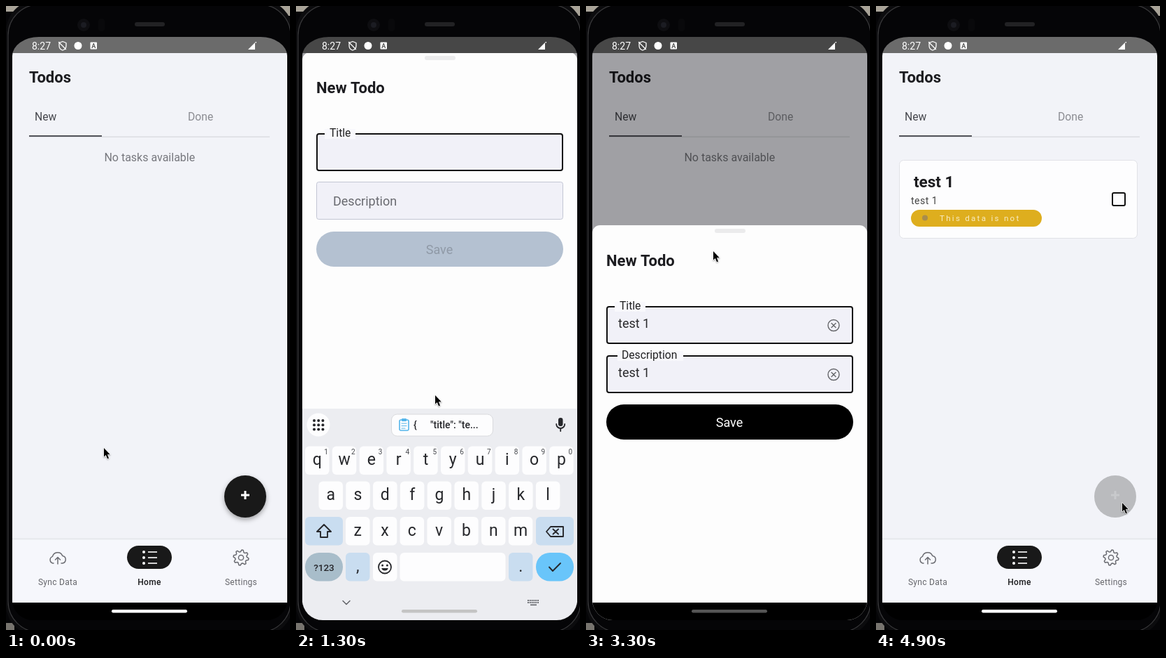
An HTML page with a canvas that plays this animation: 406x888 px, repeating every 5000 ms.

```html
<!DOCTYPE html>
<html lang="en">
<head>
<meta charset="utf-8">
<title>Todo app</title>
<style>
html, body { margin: 0; width: 100%; height: 100%; overflow: hidden; background: #000; }
canvas { display: block; }
</style>
</head>
<body>
<canvas id="stage" width="406" height="888"></canvas>
<script>
const c = document.getElementById('stage').getContext('2d');
const LOOP = 5000, STEP = 100;

// Keyframes: [time, value, ...]
const cursorPath = [[0, 140, 629], [100, 150, 634], [400, 338, 690], [600, 340, 692],
  [700, 294, 667], [1000, 210, 458], [1100, 205, 462], [1300, 199, 554], [1600, 199, 554],
  [2100, 204, 283], [2500, 204, 283], [2900, 182, 349], [3300, 182, 349], [3500, 200, 584],
  [3700, 200, 588], [4000, 219, 719], [4300, 290, 713], [4700, 352, 707]];
const sheetPath = [[700, 560], [800, 400], [900, 330], [1000, 312], [1100, 312], [1200, 96],
  [1300, 66], [1400, 67], [3100, 67], [3200, 180], [3300, 312], [3700, 312], [3800, 410],
  [3900, 610], [4000, 778], [4100, 860]];
const scrimPath = [[600, 0], [700, .34], [3700, .34], [3900, .27], [4000, .17], [4100, .07], [4200, 0]];
const toastPath = [[3800, 849], [3900, 762], [4000, 688], [4100, 670], [4200, 668]];
const barPath = [[1100, 255], [1300, 196], [1500, 50], [3100, 50], [3200, 85], [3600, 85], [3900, 255]];

function track(keys, t, i = 1) {
  if (t <= keys[0][0]) return keys[0][i];
  for (let k = 1; k < keys.length; k++) {
    const a = keys[k - 1], b = keys[k];
    if (t <= b[0]) return a[i] + (b[i] - a[i]) * (t - a[0]) / (b[0] - a[0]);
  }
  return keys[keys.length - 1][i];
}

function box(x, y, w, h, r, fill, stroke, lw = 1) {
  c.beginPath();
  c.roundRect(x, y, w, h, r);
  if (fill) { c.fillStyle = fill; c.fill(); }
  if (stroke) { c.strokeStyle = stroke; c.lineWidth = lw; c.stroke(); }
}

function dot(x, y, r, fill, stroke, lw = 1) {
  c.beginPath();
  c.arc(x, y, r, 0, 7);
  if (fill) { c.fillStyle = fill; c.fill(); }
  if (stroke) { c.strokeStyle = stroke; c.lineWidth = lw; c.stroke(); }
}

function text(s, x, y, size, color, { weight = 400, align = 'left', gap = 0 } = {}) {
  c.font = `${weight} ${size}px Roboto, sans-serif`;
  c.textAlign = align;
  c.letterSpacing = gap + 'px';
  c.fillStyle = color;
  c.fillText(s, x, y);
}

function path(d, x, y, { fill, stroke, lw = 1.5 } = {}) {
  const p = new Path2D(d);
  c.save();
  c.translate(x, y);
  c.lineJoin = c.lineCap = 'round';
  if (fill) { c.fillStyle = fill; c.fill(p); }
  if (stroke) { c.strokeStyle = stroke; c.lineWidth = lw; c.stroke(p); }
  c.restore();
}

function shadow(color, blur, dy) {
  c.shadowColor = color;
  c.shadowBlur = blur;
  c.shadowOffsetY = dy;
}

function typed(t, start) {
  return 'test 1'.slice(0, Math.max(0, Math.floor((t - start) / STEP) + 1));
}

function phone() {
  c.fillStyle = '#050507';
  c.fillRect(0, 0, 406, 888);
  c.fillStyle = '#a8a398';
  c.fillRect(0, 0, 20, 8);
  c.fillRect(390, 0, 16, 14);
  c.fillStyle = '#77746e';
  c.fillRect(0, 878, 12, 10);
  box(0, -8, 410, 904, 44, '#0c0c0e');
  box(3, -2, 404, 893, 44, '#050507', '#39393b', 1.2);
  dot(111, 27, 9, '#0e0e11');
  dot(111, 27, 4, '#1b1c22');
  box(132, 18, 9, 18, 4, '#09090b');
  box(184, 23, 43, 6, 3, '#222224');
}

function gear(x, y) {
  c.beginPath();
  for (let i = 0; i < 32; i++) {
    const a = (i + .5) / 32 * Math.PI * 2, r = i % 4 < 2 ? 11 : 8.3;
    c.lineTo(x + r * Math.cos(a), y + r * Math.sin(a));
  }
  c.closePath();
  c.lineJoin = 'round';
  c.strokeStyle = '#6b6c72';
  c.lineWidth = 1.5;
  c.stroke();
  dot(x, y, 3.6, null, '#6b6c72', 1.5);
}

function nav() {
  c.fillStyle = '#e6e7ec';
  c.fillRect(9, 757.5, 393, 2);
  c.fillStyle = '#f6f7fc';
  c.fillRect(9, 759.5, 393, 90);
  path('M-6 7h-1a5 5 0 0 1-.5-9.6A7.5 7.5 0 0 1 6.8-3.5 5.3 5.3 0 0 1 6.5 7H5M0 8v-9M-3.5 2 0-1.5 3.5 2',
    74, 786, { stroke: '#6b6c72' });
  box(173, 768, 64, 33, 16.5, '#191919');
  for (const y of [777, 785, 793]) {
    dot(197, y, 2, '#fff');
    c.fillStyle = '#fff';
    c.fillRect(203, y - .8, 13, 1.6);
  }
  gear(336, 785);
  const mid = { align: 'center', gap: .3 };
  text('Sync Data', 74, 824, 12, '#66676c', mid);
  text('Home', 205, 824, 12, '#1b1b1d', { ...mid, weight: 500 });
  text('Settings', 336, 824, 12, '#66676c', mid);
}

function fab(pressed) {
  c.save();
  if (!pressed) shadow('rgba(0,0,0,.35)', 7, 3);
  dot(342, 698, 30, pressed ? '#babbbe' : '#191919');
  c.restore();
  c.fillStyle = pressed ? '#c8c9cc' : '#fff';
  c.fillRect(336, 694.5, 12, 3);
  c.fillRect(340.5, 690, 3, 12);
}

function card(dim) {
  box(33.5, 219.5, 340, 111, 6, '#fdfdfe', '#e1e2e7');
  text('test 1', 54, 258, 22.5, '#1b1b1e', { weight: 700 });
  text('test 1', 50, 282, 14, '#444', { gap: .5 });
  box(50, 290, 187, 24, 12, dim ? '#e3b657' : '#deae1e');
  dot(70, 301.5, 4, '#a98d4c');
  text('This data is not', 91, 305.5, 11.5, '#f8ecc4', { gap: 2.3 });
  box(338, 266, 18, 18, 2, null, '#111', 2);
}

function home(t, dim) {
  c.fillStyle = '#f2f3f8';
  c.fillRect(9, 67, 393, 782);
  text('Todos', 33, 109, 22, '#1c1c20', { weight: 700 });
  text('New', 41, 163, 15.7, '#46474d');
  text('Done', 260, 163, 15.7, '#8b8c92');
  c.fillStyle = '#dcdde2';
  c.fillRect(33, 185.5, 344, 1.5);
  c.fillStyle = '#53545b';
  c.fillRect(33, 184, 104, 2);
  if (t >= 3900) card(dim);
  else text('No tasks available', 205.3, 221, 16, '#77787e', { align: 'center' });
  fab(t === 500 || t === 600 || t >= 4900);
  nav();
}

function field(label, y, active, value, labelX, gapX, gapW) {
  if (!active) {
    box(29.5, y - .5, 352, 53, 3, '#f1f1f8', '#c3c6d4');
    text(label, 53, y + 32.5, 18, '#696a70');
    return;
  }
  box(30, y + 1, 351, 52, 3, '#f1f1f8', '#111', 2);
  c.fillStyle = '#f8f8fc';
  c.fillRect(gapX, y - 6, gapW, 14);
  text(label, labelX, y + 5, 15.7, '#222');
  if (!value) return;
  text(value, 46, y + 31, 18, '#2a2a2d');
  dot(354, y + 27.5, 8, null, '#66676b', 1.4);
  path('M-3-3 3 3M3-3-3 3', 354, y + 27.5, { stroke: '#66676b', lw: 1.4 });
}

function sheet(t) {
  const y = track(sheetPath, t);
  const title = typed(t, 1400), note = typed(t, 2500);
  c.save();
  if (t >= 3900) c.globalAlpha = t < 4000 ? .85 : .65;
  box(9, y, 393, 900, 11, '#fdfdfd');
  box(184, y + 5, 44, 6, 3, '#ebebec');
  text('New Todo', 29, y + 58, 22, '#1c1c20', { weight: 700 });
  field('Title', y + 115, t >= 1200, title, 48, 41, 44);
  field('Description', y + 185, t >= 2300, note, 51, 45, 94);
  box(29, y + 255, 353, 50, 25, note ? '#000' : '#b4c1d1');
  text('Save', 205, y + 286.5, 18, note ? '#fff' : '#8f99a6', { align: 'center' });
  c.restore();
}

const BLUE = '#c9ddf0', INK = '#26272b';

function key(x, y, w, label, fill = '#fdfdfe', r = 6) {
  box(x, y, w, 40.5, r, fill);
  if (label) text(label, x + w / 2, y + 26.5, 23, INK, { align: 'center' });
}

function keyboard(dy) {
  c.save();
  c.translate(0, dy);
  c.fillStyle = '#ecedf1';
  c.fillRect(9, 573, 393, 310);
  dot(32, 596, 16.5, '#fdfdfe');
  for (let i = 0; i < 9; i++) dot(26 + i % 3 * 6.2, 590 + Math.floor(i / 3) * 6.2, 2, INK);

  box(136.5, 581, 145, 31, 8, '#fdfdfe', '#d9dadd');
  box(148, 589, 13, 15, 2, null, '#56b6ea', 1.6);
  box(151, 587, 7, 4, 1, '#56b6ea');
  path('M0 0h7M0 3.5h7M0 7h5', 151, 594, { stroke: '#56b6ea', lw: 1.2 });
  text('{', 168, 601, 14, INK, { weight: 500 });
  text('"title": "te...', 192, 601, 14, INK, { weight: 500 });

  box(375, 586, 6.5, 12, 3.2, INK);
  path('M-6 0a6 6 0 0 0 12 0M0 6v4', 378.2, 595, { stroke: INK, lw: 1.8 });

  const pitch = 38.8;
  [...'qwertyuiop'].forEach((k, i) => {
    const x = 13 + pitch * i;
    key(x, 626.5, 34.5, k);
    text((i + 1) % 10, x + 30, 638, 10, '#44464b', { align: 'center' });
  });
  [...'asdfghjkl'].forEach((k, i) => key(32.5 + pitch * i, 676.5, 34.5, k));
  [...'zxcvbnm'].forEach((k, i) => key(71 + pitch * i, 727, 34.5, k));

  key(13, 727, 54, '', BLUE);
  path('M0-10 10 0H5V8H-5V0H-10Z', 40, 748, { stroke: INK, lw: 1.9 });
  key(343, 727, 54, '', BLUE);
  path('M-12 0-6-7H12V7H-6ZM-2.5-3.5 5 3.5M5-3.5-2.5 3.5', 370, 748, { stroke: INK, lw: 1.9 });

  key(13, 778, 54, '', '#a8bdca', 20);
  text('?123', 40, 803.5, 13.5, INK, { align: 'center', weight: 500 });
  key(71, 778, 34.5, ',', BLUE);
  key(110, 778, 34.5);
  dot(127, 798.5, 9, null, INK, 1.8);
  dot(123.6, 796, 1.5, INK);
  dot(130.4, 796, 1.5, INK);
  path('M-4.8 0A5 5 0 0 0 4.8 0Z', 127, 800, { fill: INK });
  key(148.5, 778, 151, '');
  key(304, 778, 34.5, '.', BLUE);
  key(343, 778, 54, '', '#69c5fa', 20);
  path('M-8 0-3 5.5 8-5.5', 370, 798.5, { stroke: INK, lw: 1.9 });

  path('M-5-2.5 0 2.5 5-2.5', 72, 849, { stroke: '#63656a' });
  c.fillStyle = '#63656a';
  for (let i = 0; i < 12; i++) {
    c.fillRect(331 + i % 6 * 2.8, 845 + Math.floor(i / 6) * 3, 1.9, 1.9);
  }
  c.fillRect(335, 851.5, 9, 1.6);
  c.restore();
}

function statusBar(dim) {
  const g = Math.round(107 * (1 - dim));
  c.fillStyle = `rgb(${g},${g},${g})`;
  c.fillRect(9, 44, 393, 23);
  text('8:27', 37, 62, 14, '#fff');
  path('M0-6 5-4V0C5 3 3 5.5 0 6.5-3 5.5-5 3-5 0V-4ZM-5.5-5 4.5 5', 81, 56.5, { stroke: '#fff', lw: 1.3 });
  dot(103, 56.5, 5.5, '#fff');
  box(120.5, 51.5, 9.5, 10, 1, '#fff');
  text('A', 125.3, 60, 9, '#555', { align: 'center', weight: 700 });
  path('M0 10 10 0V10Z', 346, 52, { fill: '#fff' });
  c.fillStyle = '#fff';
  c.fillRect(356.5, 51, 1.5, 1.5);
}

function toast(t) {
  const y = track(toastPath, t);
  c.save();
  c.globalAlpha = track([[4400, 1], [4700, 0]], t);
  box(29, y, 353, 88, 4, '#2cad89');
  const ink = '#c6e6bf', mark = { stroke: '#8bd492', lw: 1.2 };
  dot(55, y + 44, 7.5, null, mark.stroke, mark.lw);
  path('M-3.5 0-1 2.5 3.5-2.5', 55, y + 44, mark);
  text('Success', 81, y + 32, 15, ink, { gap: .4 });
  text('Task added', 81, y + 50, 14, ink, { gap: .5 });
  text('successfully', 81, y + 68, 14, ink, { gap: .5 });
  path('M-4-4 4 4M4-4-4 4', 356, y + 44, { stroke: '#a6d685', lw: 1.2 });
  c.restore();
}

function cursor(t) {
  const arrow = 'M0 0V12.6L2.8 10 5 15.2 7 14.4 4.9 9.3H8.8Z';
  const x = track(cursorPath, t), y = track(cursorPath, t, 2);
  c.save();
  shadow('rgba(0,0,0,.35)', 2, 1);
  path(arrow, x, y, { stroke: '#fff', lw: 1.4 });
  c.restore();
  path(arrow, x, y, { fill: '#000' });
}

function draw(t) {
  const dim = track(scrimPath, t);
  const open = t >= 700 && t < 4100;
  const keys = t >= 1200 && t < 3200;
  phone();
  c.save();
  c.beginPath();
  const top = { x: 38, y: 27 };
  c.roundRect(9, 44, 393, 830, [top, top, 29, 29]);
  c.clip();
  home(t, dim);
  c.fillStyle = `rgba(0,0,0,${dim})`;
  c.fillRect(9, 67, 393, 782);
  if (open) sheet(t);
  if (t >= 3900 && t < 4700) toast(t);
  c.fillStyle = '#000';
  c.fillRect(9, 849, 393, 30);
  if (keys) keyboard(t === 1200 ? 110 : 0);
  statusBar(dim);
  c.restore();
  const g = Math.round(track(barPath, t));
  box(151, 859, 108, 4.5, 2.2, `rgb(${g},${g},${g})`);
  cursor(t);
}

function tick(now) {
  draw(Math.floor(now % LOOP / STEP) * STEP);
  requestAnimationFrame(tick);
}
requestAnimationFrame(tick);
</script>
</body>
</html>
```
